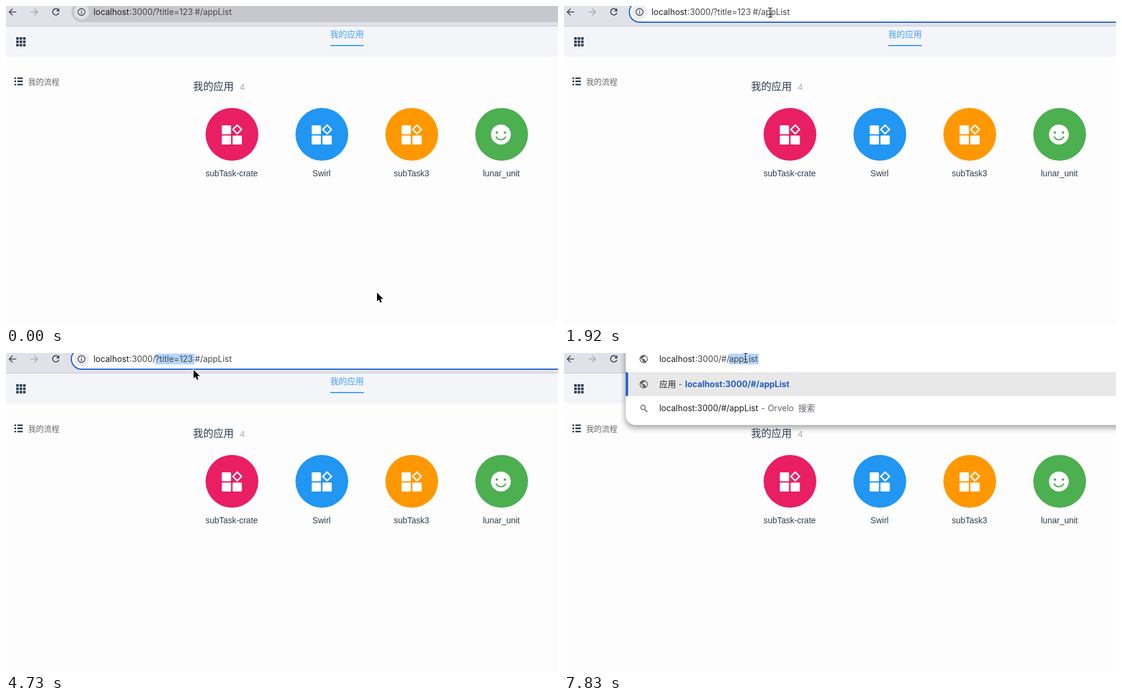
Recreate the animation shown at these times as an HTML page. Size 921 px wide and 532 px high, loop 8 s.

```html
<!DOCTYPE html>
<html lang="zh">
<head>
<meta charset="utf-8">
<title>我的应用</title>
<style>
html, body { margin: 0; width: 100%; height: 100%; overflow: hidden; background: #fdfdfd; }
svg { display: block; }
text { font: 14px "Liberation Sans", Arial, "Noto Sans CJK SC", "Noto Sans CJK", sans-serif; fill: #2c3e50; }
.ui text { font-family: Inter, "Noto Sans CJK SC", "Noto Sans CJK", sans-serif; font-size: 13.9px; fill: #1f1f1f; }
.ui .dim { fill: #474747; }
.ui .gray { fill: #5f6368; }
.ui .link { font-weight: 700; fill: #1f5cc4; }
.line { fill: none; stroke: #474a50; stroke-width: 1.7; }
</style>
</head>
<body>
<svg width="921" height="532" viewBox="0 0 921 532">
  <defs>
    <filter id="blur" x="-20%" y="-50%" width="140%" height="200%"><feGaussianBlur stdDeviation="4"/></filter>
    <path id="globe" fill="#5f6368" transform="scale(.68) translate(-12 -12)" d="M12 2C6.48 2 2 6.48 2 12s4.48 10 10 10 10-4.48 10-10S17.52 2 12 2zm-1 17.93c-3.95-.49-7-3.85-7-7.93 0-.62.08-1.21.21-1.79L9 15v1c0 1.1.9 2 2 2v1.93zm6.9-2.54c-.26-.81-1-1.39-1.9-1.39h-1v-3c0-.55-.45-1-1-1H8v-2h2c.55 0 1-.45 1-1V7h2c1.1 0 2-.9 2-2v-.41c2.93 1.19 5 4.06 5 7.41 0 2.08-.8 3.97-2.1 5.39z"/>
    <g id="tiles" fill="#fff">
      <rect x="-17" y="-15" width="15.5" height="15" rx="1.5"/>
      <rect x="-17" y="2" width="15.5" height="15" rx="1.5"/>
      <rect x="1" y="2" width="15.5" height="15" rx="1.5"/>
      <path d="M8.8-15.3L16-8.1 8.8-.9 1.6-8.1z" fill="none" stroke="#fff" stroke-width="2.5" stroke-linejoin="round"/>
    </g>
    <g id="smile">
      <circle cx="-1.3" cy=".3" r="16.6" fill="#fff"/>
      <circle cx="-8" cy="-3" r="2.1"/><circle cx="5.5" cy="-3" r="2.1"/>
      <path d="M-9.5 3.5Q-7 9-1.3 9T7 3.5" fill="none" stroke="#4caf50" stroke-width="2"/>
    </g>
  </defs>

  <!-- page -->
  <rect y="34" width="921" height="50" fill="#f4f5f9"/>
  <g id="dots" fill="#2c3e50"></g>
  <text x="541" y="52" style="fill:#409eff">我的应用</text>
  <rect x="541" y="65" width="56" height="2" fill="#409eff"/>
  <path d="M14 120.5h3m2 0h9M14 125.7h3m2 0h9M14 131h3m2 0h9" stroke="#2c3e50" stroke-width="2.7"/>
  <text x="37" y="131" style="font-size:13px;font-weight:500;fill:#666">我的流程</text>
  <text x="312" y="140" style="font-size:17px;font-weight:500">我的应用</text>
  <text x="390" y="140" style="font-size:15px;fill:#aaa">4</text>
  <g id="apps" text-anchor="middle"></g>

  <!-- toolbar -->
  <rect width="921" height="34" fill="#e1e1e9"/>
  <rect y="33" width="921" height="1" fill="#c9cad0"/>
  <path class="line" d="M17 10H6M11 4.5L5.5 10 11 15.5"/>
  <path class="line" d="M41 10h11M47 4.5L52.5 10 47 15.5" style="stroke:#a9aab0"/>
  <path class="line" d="M87.2 6.3A5.3 5.3 0 1 0 88.2 11.2"/>
  <path d="M89 3.5v5.5h-5.5z" fill="#474a50"/>

  <g class="ui" id="bar">
    <rect id="field" x="109" y="-7" width="840" height="34" rx="17"/>
    <circle id="chip" cx="126" cy="10" r="12.5"/>
    <circle class="line" cx="126" cy="10" r="5.8" style="stroke-width:1.4"/>
    <path class="line" d="M126 9.2v4M126 6.5v1.5" style="stroke-width:1.5"/>
    <rect class="sel" y="1" height="18" fill="#b4d6fd"/>
    <text x="146" y="15">localhost</text>
    <text x="206" y="15" class="dim">:3000/</text>
    <text x="249" y="15" class="dim">?title=123</text>
    <text x="315" y="15" class="dim">#/appList</text>
  </g>

  <g class="ui" id="drop">
    <rect x="101" y="-30" width="860" height="156" rx="18" fill="#000" opacity=".3" filter="url(#blur)"/>
    <rect x="103" y="-30" width="860" height="150" rx="16" fill="#fff"/>
    <rect x="103" y="32" width="818" height="40" fill="#e8e8e8"/>
    <path d="M103 32h1a3 3 0 0 1 3 3v34a3 3 0 0 1-3 3h-1z" fill="#1a62d0"/>
    <use href="#globe" x="0" y="0" transform="translate(133 10)"/>
    <use href="#globe" transform="translate(133 52)"/>
    <path class="line" d="M135 94.3l4 4" style="stroke:#5f6368"/>
    <circle class="line" cx="131.8" cy="90.8" r="3.7" style="stroke:#5f6368;stroke-width:1.5"/>
    <rect class="sel" y="1" height="18" fill="#b4d6fd"/>
    <text x="159" y="15">localhost</text>
    <text x="219" y="15" class="dim">:3000/</text>
    <text x="262.5" y="15" class="dim">#/</text>
    <text x="275.5" y="15" class="dim">appList</text>
    <text x="159" y="57">应用</text>
    <text x="191" y="57" class="gray">-</text>
    <text x="202" y="57" class="link">localhost:3000/#/appList</text>
    <text x="159" y="97">localhost:3000/#/appList</text>
    <text x="329" y="97" class="gray">-</text>
    <text x="340" y="97" class="gray">Orvelo</text>
    <text x="391" y="97" class="gray">搜索</text>
  </g>

  <rect id="caret" y="1" width="1" height="17" fill="#222"/>
  <path id="arrow" d="M0 0V14.6L3.3 11.5 5.5 16.7 8 15.6 5.8 10.5H10.5Z" stroke="#fff" stroke-width="1.6" paint-order="stroke"/>
  <g id="beam" fill="none">
    <path id="beamPath" d="M-3.5-8Q0-8 0-5.5Q0-8 3.5-8M0-5.5V5.5M-3.5 8Q0 8 0 5.5Q0 8 3.5 8M-2 2.5H2" stroke="#fff" stroke-width="2.8" opacity=".8"/>
    <use href="#beamPath"/>
  </g>
</svg>
<script>
const $ = s => document.querySelector(s);
const set = (el, attrs) => { for (const k in attrs) el.setAttribute(k, attrs[k]); };
const show = (el, on) => { el.style.display = on ? "" : "none"; };

let dots = "";
for (let i = 0; i < 9; i++)
  dots += `<rect x="${17 + i % 3 * 5.7}" y="${52 + (i / 3 | 0) * 5.6}" width="4.3" height="4.2"/>`;
$("#dots").innerHTML = dots;

$("#apps").innerHTML = [
  ["subTask-crate", "#e91e63"], ["Swirl", "#2196f3"], ["subTask3", "#ff9800"], ["lunar_unit", "#4caf50"]
].map(([name, color], i) => `<g transform="translate(${377 + 150 * i} 214)" fill="${color}">
  <circle r="44"/><use href="#${i < 3 ? "tiles" : "smile"}"/><text x="-.5" y="70">${name}</text></g>`).join("");
$("#beam use").remove();
const core = $("#beamPath").cloneNode();
core.removeAttribute("id");
set(core, { stroke: "#111", "stroke-width": 1.2, opacity: 1 });
$("#beam").append(core);

// pointer path: screen update, x, y
const TICK = 147.7;
const path = [
  [0, 619, 478], [1, 600, 460], [4, 312, 310], [5, 250, 271], [7, 423, 73], [8, 353, 47],
  [11, 344, 12], [12, 344, 12], [13, 344, 11], [16, 344, 11], [18, 354, 20], [23, 305, 8],
  [25, 305, 8], [29, 248, 16], [30, 248, 16], [32, 313, 28], [38, 313, 28], [39, 312, 28],
  [40, 312, 28], [46, 340, 9], [50, 340, 9], [53, 303, 8], [60, 303, 8]
];

function pointer(n) {
  const i = path.findIndex(p => p[0] > n);
  const [a, x, y] = path[i - 1], [b, x2, y2] = path[i];
  const k = (n - a) / (b - a);
  return [x + (x2 - x) * k, y + (y2 - y) * k];
}

function select(group, from, to) {
  set($(group + " .sel"), { x: from, width: Math.max(0, to - from) });
}

function draw(t) {
  const n = Math.floor((t + 8) / TICK);
  const [x, y] = pointer(n);
  const focus = t >= 1920, open = t >= 5780, picked = t >= 7830;

  show($("#bar"), !open);
  show($("#drop"), open);
  set($("#field"), focus
    ? { fill: "#fff", stroke: "#1a62d0", "stroke-width": 2 }
    : { fill: "#c7c7ce", stroke: "none" });
  set($("#chip"), { fill: focus ? "#ececf0" : "#e1e1e9" });

  const start = n < 26 ? 315 : n < 29 ? Math.max(249, x) : 249;
  select("#bar", start, 315);
  select("#drop", 275, picked ? 325 : 275);

  const clicked = n >= 45;
  const caretOn = open
    ? !picked && (t < 6280 || clicked && t < 7090 || t >= 7540)
    : n >= 21 && n < 26;
  show($("#caret"), caretOn);
  set($("#caret"), { x: open ? (clicked ? 325 : 263) : 315 });

  const typing = y < 26;
  show($("#beam"), typing);
  show($("#arrow"), !typing);
  set($(typing ? "#beam" : "#arrow"), { transform: `translate(${x} ${y})` });
}

function loop(now) {
  draw(now % 8000);
  requestAnimationFrame(loop);
}
draw(0);
requestAnimationFrame(loop);
</script>
</body>
</html>
```
